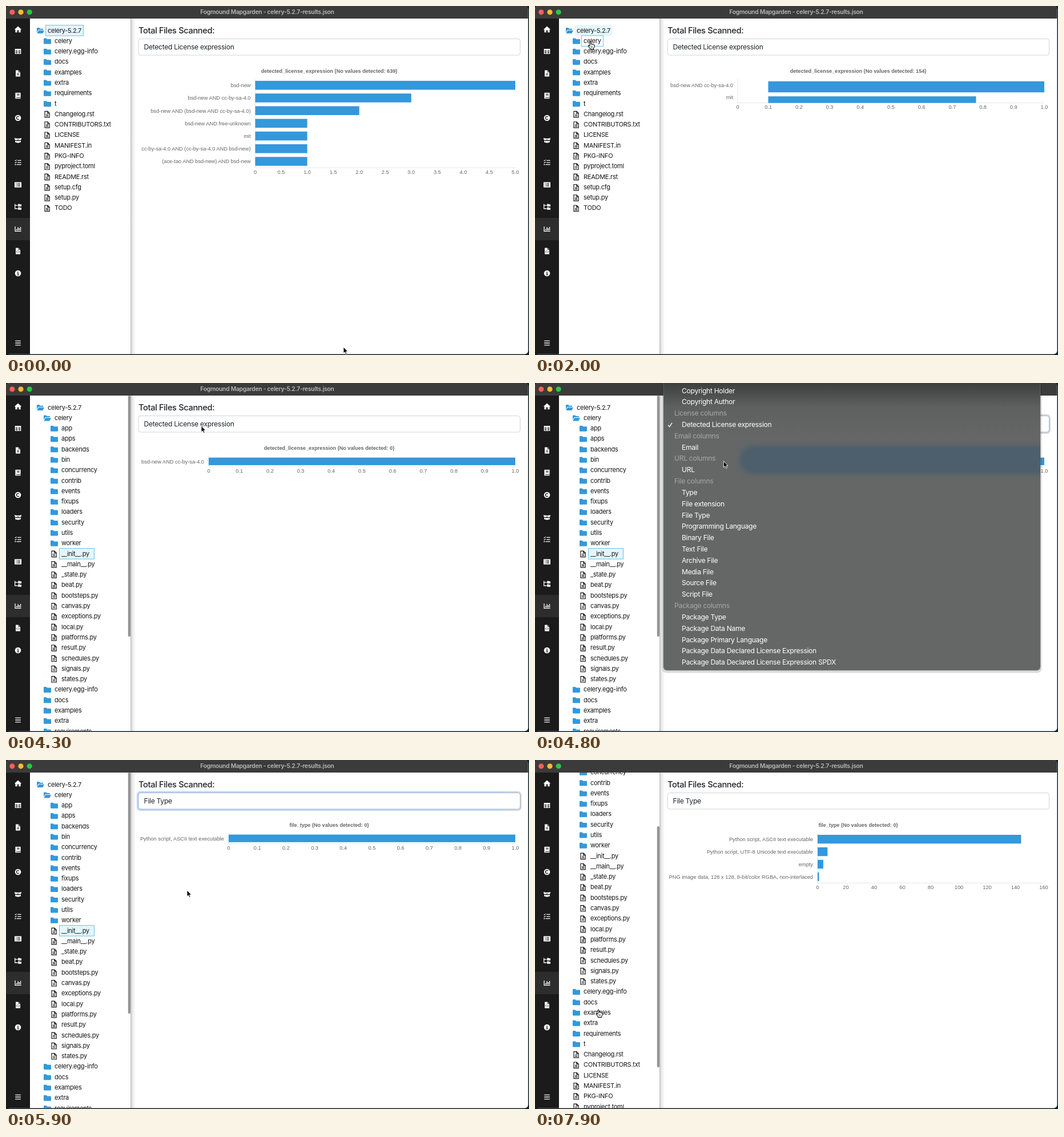
These frames come from a looping animation (916x611 px, 8 s). An HTML page:

```html
<!DOCTYPE html>
<html lang="en">
<head>
<meta charset="utf-8">
<title>License chart viewer</title>
<style>
  html, body { margin: 0; width: 100%; height: 100%; overflow: hidden; background: #10242b; }
  svg { display: block; width: 916px; height: 611px; }
  text { font-family: Inter, "Open Sans", sans-serif; letter-spacing: -.024em; white-space: pre; }
  .chart text { font-family: "Liberation Sans", Arial, sans-serif; letter-spacing: 0; }
</style>
</head>
<body>
<svg viewBox="0 0 916 611">
  <defs>
    <linearGradient id="shade"><stop stop-color="#000" stop-opacity=".27"/><stop offset=".3" stop-color="#000" stop-opacity=".1"/><stop offset="1" stop-color="#000" stop-opacity="0"/></linearGradient>
    <linearGradient id="ring"><stop offset=".94" stop-color="#bcd8fa"/><stop offset=".98" stop-color="#d9d9d9"/></linearGradient>
    <linearGradient id="glass" x2="0" y2="1"><stop stop-color="#383838"/><stop offset=".04" stop-color="#454646"/><stop offset=".1" stop-color="#5e6060"/><stop offset=".2" stop-color="#656767"/></linearGradient>
    <filter id="blur"><feGaussianBlur stdDeviation="4"/></filter>
    <clipPath id="pane"><rect x="42" y="22" width="176" height="587.5"/></clipPath>
    <clipPath id="menuBox"><rect x="225" width="660" height="503"/></clipPath>
  </defs>
  <g id="scene"></g>
</svg>
<script>
const LOOP = 8000, STEP = 100, ROW = 18.29, BLUE = '#3498db';

const clamp = v => Math.max(0, Math.min(1, v));
const smooth = v => (v = clamp(v), v * v * (3 - 2 * v));
const lerp = (a, b, p) => a + (b - a) * p;
const latest = (list, t) => list.findLastIndex(e => e.at <= t);

const rect = (x, y, w, h, fill, more = '') =>
  `<rect x="${x}" y="${y}" width="${Math.max(0, w)}" height="${Math.max(0, h)}" fill="${fill}" ${more}/>`;
const path = (d, fill, more = '') => `<path d="${d}" fill="${fill}" ${more}/>`;
const text = (x, y, s, size, fill, more = '') =>
  `<text x="${x}" y="${y + size * .36}" font-size="${size}" fill="${fill}" ${more}>${s}</text>`;
const group = (x, y, s) => `<g transform="translate(${x} ${y})">${s}</g>`;

// ---- sidebar: y, filled shape, dark strokes on top
const disc = 'M-5.3 0a5.3 5.3 0 1 0 10.6 0a5.3 5.3 0 1 0-10.6 0Z';
const page = 'M-4-5.5H1L4-2.5V5.5H-4Z';
const ICONS = [
  [41, 'M-6.3 .3L0-5.4 6.3 .3H4.6V5.2H1.3V1.6H-1.3V5.2H-4.6V.3Z', ''],
  [79.5, 'M-5.3-4.5H5.3V4.5H-5.3Z', 'M-4-.6H-.8M.8-.6H4M-4 2.3H-.8M.8 2.3H4', 1.7],
  [118, page, 'M-2 .2H2M-2 2.5H2M1.2-5.5V-2.4H4'],
  [157, 'M-4.6-5.2H4.6V5.2H-4.6Z', 'M-2-2.8H2.6M-2-.9H2.6M-3 3.2H4.6'],
  [196, disc, 'M2-1.7A2.6 2.6 0 1 0 2 1.7', 1.4],
  [235, 'M-6.3-3.8L0-2.9 6.3-3.8 5.2-.6 1.6 .3 0-2 -1.6 .3-5.2-.6ZM-4.9 .7L-1 1.7 0 .2 1 1.7 4.9 .7V3.4L0 4.8-4.9 3.4Z', ''],
  [274, 'M-.8-4.3H5.6V-3H-.8ZM-.8-.6H5.6V.7H-.8ZM-2.5 3H5.6V4.3H-2.5ZM-5.6 2.8H-3.8V4.5H-5.6ZM-5.8-3.6L-5-4.3-4.3-3.6-2.6-5.3-2-4.6-4.3-2.2ZM-5.8 .1L-5-.6-4.3 .1-2.6-1.6-2-.9-4.3 1.5Z', ''],
  [313, 'M-6-4.6H6V4.6H-6Z', 'M-4-2.2H-2.6M-1.4-2.2H4M-4 0H-2.6M-1.4 0H4M-4 2.2H-2.6M-1.4 2.2H4'],
  [351.5, 'M-6-5H-4.7V-3H-.5V-1.7H-4.7V2.6H-.5V3.9H-6ZM.2-5H2.5L3.3-4.2H6V-.4H.2ZM.2 .7H2.5L3.3 1.5H6V5.2H.2Z', ''],
  [390.5, 'M-5.6-4.6H-4.3V3.3H5.6V4.6H-5.6ZM-3 0H-1.6V2.3H-3ZM-.7-3.3H.7V2.3H-.7ZM1.6-1.6H3V2.3H1.6ZM3.9-3.8H5.2V2.3H3.9Z', ''],
  [429, page, 'M-.9-.4L-2.5 1.3-.9 3M.9-.4L2.5 1.3 .9 3M1.2-5.5V-2.4H4'],
  [468, disc, 'M0-3.3V-1.7M-1-.5H.2V2.9M-1.2 2.9H1.4', 1.3],
  [590, 'M-4.8-4.2H4.8V-2.9H-4.8ZM-4.8-.65H4.8V.65H-4.8ZM-4.8 2.9H4.8V4.2H-4.8Z', '']
];

function sidebar() {
  return rect(0, 22, 42, 587.5, '#1b1b1b') + rect(0, 371, 42, 39, '#2d2d2d') +
    ICONS.map(([y, shape, marks, w = 1]) => group(21, y,
      path(shape, '#fff') + path(marks, 'none', `stroke="#1b1b1b" stroke-width="${w}"`))).join('');
}

// ---- file tree
const words = s => s.split(' ');
const KIDS = words('app apps backends bin concurrency contrib events fixups loaders security utils worker ' +
  '__init__.py __main__.py _state.py beat.py bootsteps.py canvas.py exceptions.py local.py platforms.py ' +
  'result.py schedules.py signals.py states.py');
const REST = words('celery.egg-info docs examples extra requirements t Changelog.rst CONTRIBUTORS.txt LICENSE ' +
  'MANIFEST.in PKG-INFO pyproject.toml README.rst setup.cfg setup.py TODO');
const PICKS = [
  { at: -1000, name: 'celery-5.2.7', w: 67 },
  { at: 2000, name: 'celery', w: 39 },
  { at: 3600, name: '__init__.py', w: 62 },
  { at: 6700, name: 'celery', w: 39 }
];
const FOLDER = 'M0-4Q0-5 1-5H4.6L6.2-3.4H12Q13-3.4 13-2.4V4Q13 5 12 5H1Q0 5 0 4Z';
const OPEN = 'M0 3.6V-4Q0-5 1-5H4.2L5.8-3.4H10Q11-3.4 11-2.4V-1.4H3.4Q2.4-1.4 2-.6ZM.4 5L2.8 .2Q3-.4 3.7-.4H13L10.6 4.4Q10.3 5 9.6 5Z';

function treeRow(name, depth, y, kind, t) {
  const x = 54 + 12 * depth, now = latest(PICKS, t), fade = clamp((t - PICKS[now].at) / 300);
  let s = '';
  const mark = (p, a, line) => p && p.name === name && (a > 0 || line) &&
    (s += rect(x + 15.5, y - 9, p.w - 1, 18.5, '#e4f6fd', `fill-opacity="${a}" stroke="${line ? '#62c3e8' : 'none'}"`));
  mark(PICKS[now - 1], 1 - fade, false);
  mark(PICKS[now], fade, true);
  s += group(x, y + .5, kind === 'file'
    ? path('M2-5H7L10.2-1.8V5.4H2ZM6.8-5V-1.6H10.2M4 .6H8.2M4 2.9H8.2', 'none', 'stroke="#111" stroke-width="1.15"')
    : path(kind === 'open' ? OPEN : FOLDER, BLUE));
  return s + text(x + 19, y, name, 11, '#151515');
}

function tree(t) {
  const full = KIDS.length * ROW;
  const grown = t >= 2800 ? full : (full + 15) * smooth((t - 2300) / 400);
  const scroll = 131 * smooth((t - 7100) / 800);
  const y0 = 42.6 - scroll;
  let s = treeRow('celery-5.2.7', 0, y0, 'open', t) +
    treeRow('celery', 1, y0 + ROW, grown ? 'open' : 'dir', t);
  KIDS.forEach((n, i) => {
    if ((i + .8) * ROW < grown) s += treeRow(n, 2, y0 + (i + 2) * ROW, i < 12 ? 'dir' : 'file', t);
  });
  REST.forEach((n, i) => s += treeRow(n, 1, y0 + (i + 2) * ROW + grown, i < 6 ? 'dir' : 'file', t));
  const view = 588, total = 18 * ROW + grown + 33;
  if (total > view)
    s += rect(213.8, 22 + scroll * view / total, 4.2, view * view / total, '#949494', 'rx="2"');
  return `<g clip-path="url(#pane)">${s}</g>`;
}

// ---- bar chart
const CC = 'bsd-new AND cc-by-sa-4.0', ASCII = 'Python script, ASCII text executable';
const LICENSE = 'detected_license_expression', TYPE = 'file_type';
const CHARTS = [
  { at: -1000, name: LICENSE, none: 639, x0: 436.5, max: 5, step: .5, pitch: 22.2,
    bars: [['bsd-new', 5], [CC, 3], ['bsd-new AND (bsd-new AND cc-by-sa-4.0)', 2], ['bsd-new AND free-unknown', 1],
      ['mit', 1], ['cc-by-sa-4.0 AND (cc-by-sa-4.0 AND bsd-new)', 1], ['(ace-tao AND bsd-new) AND bsd-new', 1]] },
  { at: 2000, name: LICENSE, none: 154, x0: 355, max: 1, step: .1, pitch: 21, bars: [[CC, 1], ['mit', 1]] },
  { at: 3600, name: LICENSE, none: 0, x0: 355, max: 1, step: .1, pitch: 19, bars: [[CC, 1]] },
  { at: 5800, name: TYPE, none: 0, x0: 390, max: 1, step: .1, pitch: 19, bars: [[ASCII, 1]] },
  { at: 6700, name: TYPE, none: 0, x0: 495, max: 160, step: 20, pitch: 21.9,
    bars: [[ASCII, 144], ['Python script, UTF-8 Unicode text executable', 7], ['empty', 4],
      ['PNG image data, 128 x 128, 8-bit/color RGBA, non-interlaced', 1]] }
];
const TOP = 127.7;

function barBox(c, i) {
  const right = c.max > 10 ? 891 : 892, bar = c.bars[i];
  const h = c.pitch * .7;
  return { x: c.x0, w: bar ? bar[1] / c.max * (right - c.x0) : 0, y: TOP + c.pitch * (i + .5) - h / 2, h };
}

function chart(t) {
  const n = latest(CHARTS, t), c = CHARTS[n], old = CHARTS[n - 1] || c;
  const p = 1 - (1 - clamp((t - c.at + 100) / 1000)) ** 4;
  const bump = Math.max(0, old.bars.length - c.bars.length) / 5 * 4 * p * (1 - p);
  const bottom = TOP + c.pitch * c.bars.length, right = barBox(c, 0).x + (c.max > 10 ? 396 : 892 - c.x0);
  let s = text(566, 114, `${c.name} (No values detected: ${c.none})`, 9.1, '#666', 'font-weight="bold" text-anchor="middle"');
  s += path(`M${c.x0} ${TOP}V${bottom}H${right}`, 'none', 'stroke="#e2e6e9"');
  c.bars.forEach(([label], i) => {
    const a = barBox(old, i), b = barBox(c, i);
    const x = lerp(a.x, b.x, p), end = lerp(a.x + a.w, b.x + b.w, p);
    const y = lerp(a.y, b.y, p) + (1 + 5 * i) * bump, h = lerp(a.h, b.h, p) + 4.5 * bump;
    const left = Math.max(x, c.x0);
    s += rect(left, y, end - left, Math.min(h, bottom - y), BLUE);
    s += text(c.x0 - 8, TOP + c.pitch * (i + .5), label, 9.25, '#666', 'text-anchor="end"');
  });
  const count = Math.round(c.max / c.step);
  for (let i = 0; i <= count; i++) {
    const v = i * c.step;
    s += text(lerp(c.x0, right, i / count), bottom + 7.4, c.max > 10 || !i ? v : v.toFixed(1), 9.25, '#666', 'text-anchor="middle"');
  }
  return `<g class="chart">${s}</g>`;
}

// ---- select field and its menu; headings start with #
const MENU = ('Copyright Holder|Copyright Author|#License columns|Detected License expression|#Email columns|Email|' +
  '#URL columns|URL|#File columns|Type|File extension|File Type|Programming Language|Binary File|Text File|' +
  'Archive File|Media File|Source File|Script File|#Package columns|Package Type|Package Data Name|' +
  'Package Primary Language|Package Data Declared License Expression|Package Data Declared License Expression SPDX').split('|');

function field(t) {
  const focus = t >= 4500 && t < 6700;
  return text(232, 42.5, 'Total Files Scanned:', 14.6, '#212529', 'font-weight="500"') +
    (focus ? rect(230.5, 56, 671, 31.5, 'none', 'rx="5" stroke="url(#ring)" stroke-width="3.2"') : '') +
    rect(232, 57.5, 668.5, 28.5, '#fff', `rx="4" stroke="${focus ? '#9db4d0' : '#cfd3d7'}"`) +
    text(241.5, 72, t < 5800 ? MENU[3] : MENU[11], 12.15, '#212529');
}

function menu(t, y) {
  if (t < 4500 || t >= 5900) return '';
  const pitch = 19.82, hot = Math.round((y - 13.2) / pitch);
  let s = rect(222.5, -10, 665, 517.5, '#000', 'fill-opacity=".14" rx="8"') +
    rect(225, -10, 660, 513, 'url(#glass)', 'rx="6" stroke="#777" stroke-width=".6"') +
    `<g clip-path="url(#menuBox)">${rect(358, 109, 560, 51, '#4d5e6c', 'rx="25" filter="url(#blur)"')}</g>`;
  MENU.forEach((item, i) => {
    const cy = 13.2 + i * pitch, head = item[0] === '#';
    if (i === hot && !head) s += rect(229, cy - 9.9, 651.5, 19.8, '#588fec', 'rx="4"');
    s += text(head ? 244 : 257, cy, item.replace('#', ''), 12.1, head ? '#a6a7a7' : '#fff');
  });
  s += path('M233.3 73.8L235.6 76.6 240 69.8', 'none', 'stroke="#fff" stroke-width="1.4"');
  return `<g opacity="${t < 5800 ? 1 : .4}">${s}</g>`;
}

// ---- pointer: time, x, y
const MOVES = [
  [0, 591, 597], [500, 405, 482], [700, 405, 482], [1600, 89, 65], [1800, 97, 62], [2000, 97, 62],
  [2500, 78, 62], [2800, 78, 62], [3400, 124, 297], [3600, 124, 297], [4300, 342, 75], [4400, 342, 75],
  [5300, 314, 223], [5500, 316, 227], [5700, 316, 227], [5900, 317, 228], [6600, 97, 62], [6700, 97, 62],
  [7100, 111, 437], [8000, 111, 437]
];

function pointerAt(t) {
  const i = MOVES.findIndex(m => m[0] > t), [t0, x0, y0] = MOVES[i - 1], [t1, x1, y1] = MOVES[i];
  const p = smooth((t - t0) / (t1 - t0));
  return [lerp(x0, x1, p), lerp(y0, y1, p)];
}

function pointer(x, y) {
  const hand = 'M-1 1Q0-.6 1.2 1V5Q2.4 4 3.3 5.2 4.6 4.4 5.4 5.8 7.2 5.4 7.2 7.4 7.2 10 5.6 11.8V13.6H-.6V12.2Q-2.4 10.4-3.8 7.8-3.6 6.2-2.2 6.9L-1 8.2Z';
  return group(x, y, x < 195
    ? path(hand, '#fff', 'stroke="#111" stroke-width="1.1" stroke-linejoin="round"') + path('M1.4 8V11.5M3.3 8V11.5', 'none', 'stroke="#111" stroke-width=".7"')
    : path('M0 0V11L2.5 8.8 4.2 12.6 6 11.8 4.4 8.1H7.7Z', '#000', 'stroke="#fff" stroke-width=".9"'));
}

function frame(t) {
  const [px, py] = pointerAt(t);
  const lights = ['#ff5f57', '#febc2e', '#28c840']
    .map((c, i) => `<circle cx="${10.8 + 15.2 * i}" cy="10.8" r="4.6" fill="${c}"/>`).join('');
  return rect(0, 0, 914.5, 609.5, '#fff', 'rx="6"') +
    path('M0 22V6Q0 0 6 0H908.5Q914.5 0 914.5 6V22Z', '#3b3b3b') + lights +
    text(457.5, 10.4, 'Fogmound Mapgarden - celery-5.2.7-results.json', 10.3, '#b9b9b9', 'font-weight="600" text-anchor="middle"') +
    sidebar() + tree(t) + rect(218, 22, 9, 587.5, 'url(#shade)') +
    field(t) + chart(t) + menu(t, py) + pointer(px, py);
}

const scene = document.getElementById('scene');
let shown = -1;
function tick(now) {
  const t = Math.floor(now % LOOP / STEP) * STEP;
  if (t !== shown) scene.innerHTML = frame(shown = t);
  requestAnimationFrame(tick);
}
tick(performance.now());
</script>
</body>
</html>
```
